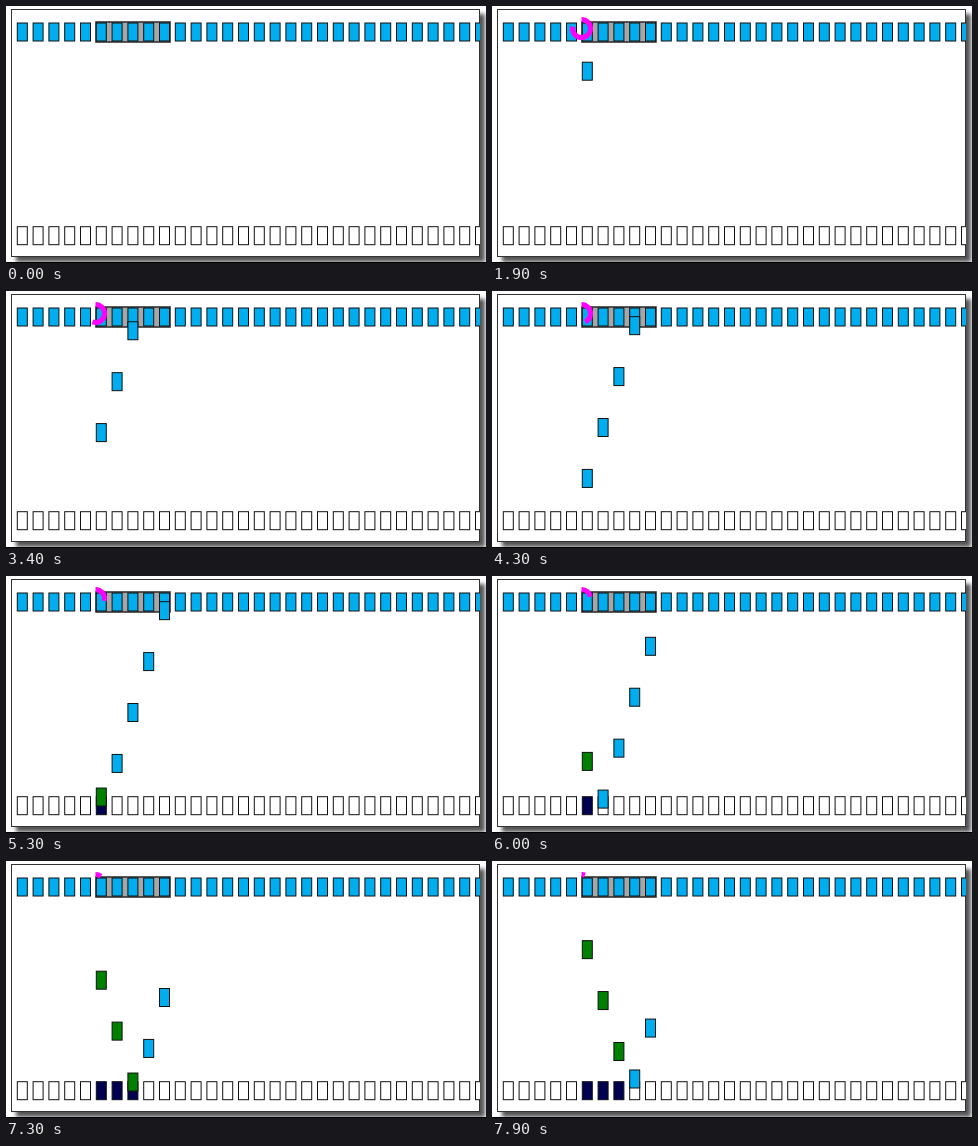
Recreate the animation shown at these times as an HTML page with a canvas. Size 480 by 257 pixels, loop 8000 ms.

```html
<!DOCTYPE html>
<html lang="en">
<head>
<meta charset="utf-8">
<title>Sliding window</title>
<style>
  html, body { margin: 0; width: 100%; height: 100%; overflow: hidden; background: #fff; }
  canvas { display: block; }
</style>
</head>
<body>
<canvas id="stage" width="480" height="257"></canvas>
<script>
const ctx = document.getElementById('stage').getContext('2d');

const LOOP = 8000;
const COUNT = 30, FIRST_X = 11.3, PITCH = 15.8, BOX_W = 10, BOX_H = 18;
const TOP_Y = 17, BOTTOM_Y = 220.7;
const WINDOW_START = 5, WINDOW_SIZE = 5;
const FIRST_SEND = 1130, SEND_GAP = 1000, TRAVEL = 4000;
const BLUE = '#00aeef', GREEN = '#008000', NAVY = '#000050', MAGENTA = '#ff00ff';

// Remaining timer angle in degrees at [time, angle]
const TIMER = [[500, 360], [1900, 282], [3400, 200], [4300, 155], [5300, 105], [6700, 52], [7900, 22]];

const boxX = i => FIRST_X + i * PITCH;

function box(i, y, fill) {
  ctx.fillStyle = fill;
  ctx.strokeStyle = '#111';
  ctx.lineWidth = 1;
  ctx.fillRect(boxX(i), y, BOX_W, BOX_H);
  ctx.strokeRect(boxX(i), y, BOX_W, BOX_H);
}

function drawPanel() {
  ctx.fillStyle = '#fff';
  ctx.fillRect(0, 0, 480, 257);
  ctx.save();
  ctx.shadowColor = '#555';
  ctx.shadowBlur = 4;
  ctx.shadowOffsetX = ctx.shadowOffsetY = 5;
  ctx.fillRect(5, 3, 469, 248);
  ctx.restore();
  ctx.fillStyle = '#000';
  ctx.fillRect(0, 256, 480, 1);
  ctx.strokeStyle = '#333';
  ctx.lineWidth = 1;
  ctx.strokeRect(5.5, 3.5, 468, 247);
}

function drawRows(t) {
  ctx.fillStyle = '#a6a6a6';
  ctx.strokeStyle = '#333';
  ctx.lineWidth = 1.6;
  ctx.fillRect(90, 16, 74, 20);
  ctx.strokeRect(90, 16, 74, 20);
  for (let i = 0; i < COUNT; i++) {
    const order = i - WINDOW_START;
    const received = order >= 0 && order < WINDOW_SIZE && t >= FIRST_SEND + order * SEND_GAP + TRAVEL;
    box(i, TOP_Y, BLUE);
    box(i, BOTTOM_Y, received ? NAVY : '#fff');
  }
}

function drawPackets(t) {
  for (let k = 0; k < WINDOW_SIZE; k++) {
    const trip = (t - FIRST_SEND - k * SEND_GAP) / TRAVEL;
    if (trip < 0 || trip > 2) continue;
    const depth = trip < 1 ? trip : 2 - trip;
    box(WINDOW_START + k, TOP_Y + (BOTTOM_Y - TOP_Y) * depth, trip < 1 ? BLUE : GREEN);
  }
}

function timerAngle(t) {
  let n = TIMER.findIndex(([time]) => time > t);
  if (n < 0) n = TIMER.length - 1;
  const [t0, a0] = TIMER[n - 1], [t1, a1] = TIMER[n];
  return a0 + (a1 - a0) * (t - t0) / (t1 - t0);
}

function drawTimer(t) {
  if (t < TIMER[0][0]) return;
  const start = -Math.PI / 2;
  ctx.strokeStyle = MAGENTA;
  ctx.lineWidth = 5;
  ctx.beginPath();
  ctx.arc(89.5, 22.5, 9, start, start + timerAngle(t) * Math.PI / 180);
  ctx.stroke();
}

function draw(now) {
  const t = Math.floor(now % LOOP / 100) * 100;
  drawPanel();
  ctx.save();
  ctx.beginPath();
  ctx.rect(5, 3, 469, 248);
  ctx.clip();
  drawRows(t);
  drawPackets(t);
  drawTimer(t);
  ctx.restore();
  requestAnimationFrame(draw);
}
requestAnimationFrame(draw);
</script>
</body>
</html>
```
